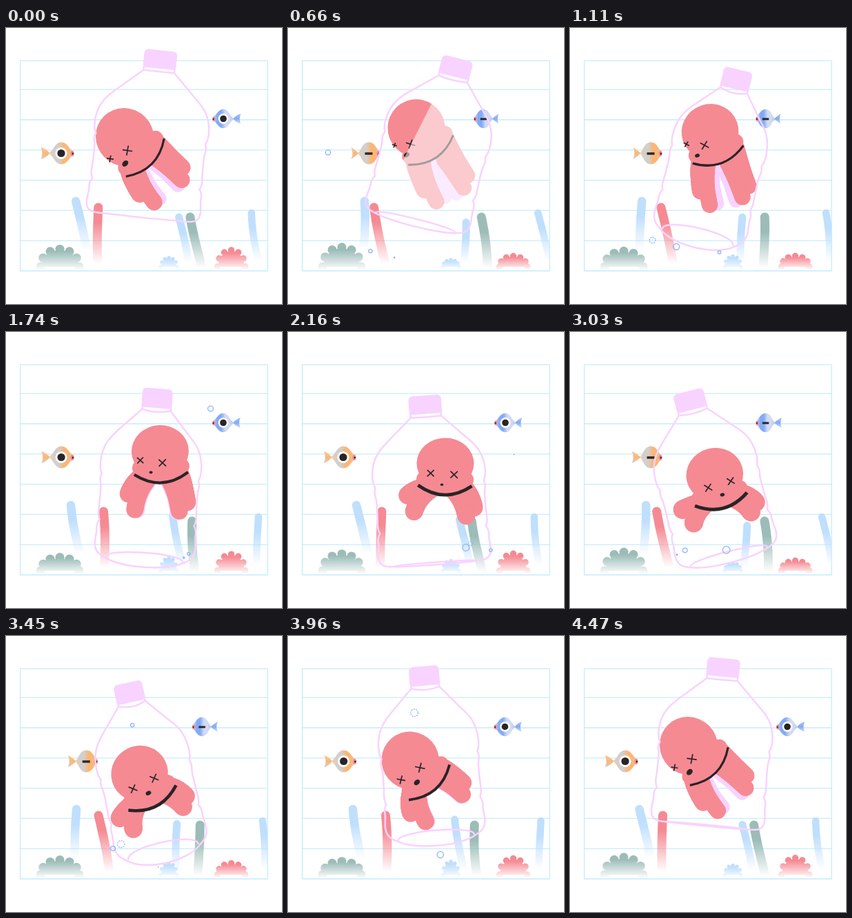
Write an HTML page with a canvas that moves like this. It is 400 by 400 pixels and loops after 4.5 s.

```html
<!DOCTYPE html>
<html lang="en">
<head>
<meta charset="utf-8">
<title>Octopus in a bottle</title>
<style>
html, body { margin: 0; width: 100%; height: 100%; overflow: hidden; background: #fff; }
canvas { display: block; width: 400px; height: 400px; }
</style>
</head>
<body>
<canvas id="stage"></canvas>
<script>
const LOOP = 4500, HALF = LOOP / 2, TAU = Math.PI * 2, DEG = Math.PI / 180;
const SALMON = '#f58a93', LILAC = '#f8d3ff', INK = '#2a2426';
const GREEN = '156,188,184', RED = '245,138,147', BLUE = '191,223,253';

const dpr = window.devicePixelRatio || 1;
function setup(c) {
  c.width = c.height = 400 * dpr;
  const g = c.getContext('2d');
  g.lineCap = g.lineJoin = 'round';
  g.scale(dpr, dpr);
  return g;
}
const stage = setup(document.getElementById('stage'));
const layer = document.createElement('canvas');
const octo = setup(layer);

const mix = (a, b, u) => a + (b - a) * u;

// Sine over one period that reaches mean + amp at time peak
const wave = (t, mean, amp, peak, period = LOOP) =>
  mean + amp * Math.cos(TAU * (t - peak) / period);

function ramp(t, from, to) {
  const u = Math.min(1, Math.max(0, (t - from) / (to - from)));
  return u * u * (3 - 2 * u);
}

function fade(g, rgb, y0, y1) {
  const f = g.createLinearGradient(0, y0, 0, y1);
  f.addColorStop(0, `rgb(${rgb})`);
  f.addColorStop(1, `rgba(${rgb},0)`);
  return f;
}

function disc(g, x, y, rx, ry, color) {
  g.fillStyle = color;
  g.beginPath();
  g.ellipse(x, y, rx, ry, 0, 0, TAU);
  g.fill();
}

function grid(g) {
  g.strokeStyle = '#c5edfb';
  g.lineWidth = 1.3;
  g.strokeRect(20.7, 47.4, 358.4, 304.6);
  g.beginPath();
  for (let i = 1; i <= 6; i++) {
    g.moveTo(21, 352 - 43.8 * i);
    g.lineTo(379, 352 - 43.8 * i);
  }
  g.stroke();
}

// The sway runs down the stem, so the foot follows an earlier phase than the tip
function weed(g, rgb, width, tip, foot, y0, y1, peak, t) {
  g.strokeStyle = fade(g, rgb, y0 + 22, y1 - 2);
  g.lineWidth = width;
  g.beginPath();
  for (let s = 0; s <= 1.001; s += 0.1) {
    g.lineTo(wave(t, mix(tip, foot, s), 8.5, peak - 500 * s, HALF), mix(y0, y1, s));
  }
  g.stroke();
}

function coral(g, rgb, x, size, h) {
  const y = 346, r = size * 0.19, rx = size - r, ry = h - r;
  g.fillStyle = fade(g, rgb, y - h * 0.7, y + 5);
  g.beginPath();
  g.ellipse(x, y, rx * 0.95, ry * 0.95, 0, Math.PI, TAU);
  for (let i = 0; i <= 6; i++) {
    const a = Math.PI * (1 + i / 6);
    const px = x + rx * Math.cos(a), py = y + ry * Math.sin(a);
    g.moveTo(px + r, py);
    g.arc(px, py, r, 0, TAU);
  }
  g.fill();
}

function seabed(g, t) {
  g.save();
  g.beginPath();
  g.rect(21, 47, 358, 305);
  g.clip();
  weed(g, BLUE, 12.5, 102.5, 109, 251, 324, 620, t);
  weed(g, RED, 13, 133, 141.5, 260, 344, 1720, t);
  weed(g, BLUE, 11, 250, 256, wave(t, 274, 8, 560, HALF), 342, 540, t);
  weed(g, GREEN, 13, 274.5, 282, 274, 350, 960, t);
  weed(g, BLUE, 10.5, 363.5, 371, 268, 340, 1280, t);
  coral(g, GREEN, 78, 34.5, wave(t, 30.5, 5, 450, HALF));
  coral(g, RED, 326.5, 25, wave(t, 24.5, 5.5, 2000, HALF));
  coral(g, BLUE, 236, 14.5, wave(t, 17, 5, 1600, HALF));
  g.restore();
}

function fish(g, x, y, dir, size, shut, [tint, pale, deep], t) {
  const tail = wave(t, -27.5, 2, HALF / 10, HALF / 5), w = 17.5 - 2 * shut;
  g.save();
  g.translate(x, y);
  g.scale(dir * size, size);
  const skin = g.createLinearGradient(-w, 0, w, 0);
  [tint, pale, pale, deep, deep, pale].forEach((c, i) => skin.addColorStop(i / 5, c));
  const fin = g.createLinearGradient(0, -8, 0, 8);
  [tint, deep, pale].forEach((c, i) => fin.addColorStop(i / 2, c));
  g.fillStyle = fin;
  g.beginPath();
  g.moveTo(-w + 1, 0);
  g.quadraticCurveTo(-22, -7, tail, -8.5);
  g.quadraticCurveTo(tail + 4, 0, tail, 8.5);
  g.quadraticCurveTo(-22, 7, -w + 1, 0);
  g.fill();
  g.fillStyle = skin;
  g.beginPath();
  g.moveTo(-w, 0);
  g.bezierCurveTo(-10, -6, -9, -16, 0, -16);
  g.bezierCurveTo(9, -16, 11, -6, w, -3);
  g.quadraticCurveTo(w + 2, 0, w, 3);
  g.bezierCurveTo(11, 6, 9, 16, 0, 16);
  g.bezierCurveTo(-9, 16, -10, 6, -w, 0);
  g.fill();
  disc(g, w - 1.5, 0.5, 2.6, 4, SALMON);
  disc(g, w - 0.8, 0.5, 1.2, 1.5, INK);
  if (shut > 0.8) {
    g.fillStyle = INK;
    g.fillRect(-5.5, -1.2, 11, 3.4);
  } else {
    disc(g, 0, 0, 8.6, 8.6 * (1 - shut), '#fff');
    disc(g, 0, 0, 5.6, 5.6 * (1 - shut), INK);
  }
  g.restore();
}

// Bubbles start near the bed, every fourth one higher up
let seed = 7;
const random = () => (seed = seed * 16807 % 2147483647) / 2147483647;
const bubbles = Array.from({ length: 14 }, (_, i) => ({
  birth: 40 + i * 260,
  x: mix(58, 350, random()),
  y: i % 4 ? mix(325, 340, random()) : mix(110, 210, random()),
  r: mix(3, 5.5, random())
}));

function bubble(g, { birth, x, y, r }, t) {
  const age = t - birth;
  if (age < 0 || age > 830) return;
  g.strokeStyle = '#8fb2fa';
  g.lineWidth = 1.3;
  g.setLineDash(age > 730 ? [1, 2.4] : []);
  g.beginPath();
  g.arc(x, y - age * 0.035, r * Math.min(1, age / 600), 0, TAU);
  g.stroke();
  g.setLineDash([]);
}

// Tapered limb: a row of discs along a curve
function limb(g, x, tipX, tipY, r, color) {
  const y = 34;
  for (let s = 0; s <= 1; s += 0.03125) {
    const bend = s * (1 - s) * 0.5;
    const px = mix(x, tipX, s + bend), py = mix(y, tipY, s - bend * 0.5);
    const pr = mix(14, r, Math.min(1, s * 1.5));
    disc(g, px, py, pr, pr, color);
  }
}

function cross(g, x, y, sx, s) {
  g.beginPath();
  g.moveTo(x - sx, y - s);
  g.lineTo(x + sx, y + s);
  g.moveTo(x + sx, y - s);
  g.lineTo(x - sx, y + s);
  g.stroke();
}

// Eyes and mouth sit on a sphere that turns sideways
function face(g, t, tilt) {
  const R = 41, yaw = Math.asin(wave(t, -14.5, 18.5, 2875) / R);
  g.strokeStyle = INK;
  g.lineWidth = 1.7;
  for (const a of [yaw - 0.43, yaw + 0.43]) {
    g.save();
    g.translate(R * Math.sin(a), 17 * Math.cos(a));
    g.rotate(-tilt * 0.2);
    cross(g, 0, 0, 4.8 * Math.cos(a) ** 0.5, 4.6 * Math.cos(a) ** 0.5);
    g.restore();
  }
  const m = wave(t, 3.7, 1.3, 4375);
  disc(g, R * Math.sin(yaw), 16 + 15 * Math.cos(yaw), m, m * 0.75, INK);
}

function octopus(g, t) {
  const tilt = wave(t, -22, 23, 2150) * DEG;
  const curl = wave(t, 0.5, 0.5, 2875);
  const chin = wave(t, 28, 5, 4190);
  const peek = 14 * (1 - curl) ** 2;
  g.clearRect(0, 0, 400, 400);
  g.save();
  g.translate(wave(t, 200, 28, 2160), wave(t, 176, 31, 2940));
  g.rotate(tilt);

  // base, tip across, tip down, spread when curled, lilac inside
  for (const [x, tx, ty, spread, inside] of [
    [26, 24, 98, 24, -1], [9, 10, 110, 28, -1], [-25, -40, 82, -18, 0], [-16, -34, 105, -13, 1]
  ]) {
    const px = tx + spread * curl, py = ty - 45 * curl, r = mix(11.5, 13.5, curl);
    if (inside) limb(g, x + inside * peek * 0.5, px + inside * peek, py + 2, r - 2, LILAC);
    limb(g, x, px, py, r, SALMON);
  }

  disc(g, 0, 0, 41.5, wave(t, 40, 3, 0), SALMON);
  g.strokeStyle = SALMON;
  g.lineWidth = 23;
  g.beginPath();
  g.moveTo(-30, chin);
  g.lineTo(30, chin);
  g.stroke();

  const y = chin + 9;
  g.beginPath();
  g.moveTo(-39, y);
  g.quadraticCurveTo(0, y + 27, 39, y);
  g.fill();
  g.strokeStyle = INK;
  g.lineWidth = wave(t, 4, 1.1, 2750);
  g.lineCap = 'butt';
  g.stroke();
  g.lineCap = 'round';
  face(g, t, tilt);
  g.restore();
  glare(g, t);
}

// Slanted sheen passing over the octopus
function glare(g, t) {
  const x = 208 + (t - 660) * 0.8;
  if (x < -60 || x > 330) return;
  g.globalCompositeOperation = 'source-atop';
  g.fillStyle = 'rgba(255,255,255,.55)';
  g.beginPath();
  g.moveTo(x + 4, 100);
  g.lineTo(x + 154, 100);
  g.lineTo(x + 64, 280);
  g.lineTo(x - 86, 280);
  g.fill();
  g.globalCompositeOperation = 'source-over';
}

function bottle(g, t) {
  // Nodding twice per loop narrows the bottle and rounds its base
  const nod = wave(t, 0, 1, HALF / 12, HALF);
  const w = 76 + 8 * nod, base = Math.max(0, 12 - 13 * nod);
  const narrow = 0.3 + 0.7 * w / 83, neck = 22.5 * narrow, cap = 24 * narrow;
  g.save();
  g.translate(209, wave(t, 216, 31, 2375));
  g.rotate(wave(t, 0, 14.5, 825) * DEG);
  g.translate(0, -123);
  g.fillStyle = g.strokeStyle = LILAC;
  g.lineWidth = 2.5;
  g.beginPath();
  g.roundRect(-cap, -31, cap * 2, 26.5 + base * 0.1, [6, 6, 4, 4]);
  g.fill();
  g.beginPath();
  g.moveTo(-neck, 0);
  g.quadraticCurveTo(0, base * 0.35, neck, 0);
  const mid = -2, floor = 212;
  for (const side of [-1, 1]) {
    const p = k => mid + side * k * w;
    g.moveTo(side * neck, -6);
    g.lineTo(side * neck, 0);
    g.lineTo(p(0.7), 33);
    g.bezierCurveTo(p(0.86), 45, p(0.98), 56, p(1), 78);
    g.quadraticCurveTo(p(1.01), 92, p(0.96), 98);
    g.quadraticCurveTo(p(1), 104, p(0.97), 112);
    g.quadraticCurveTo(p(0.95), 118, p(0.97), 150);
    g.quadraticCurveTo(p(0.98), 158, p(0.94), 164);
    g.quadraticCurveTo(p(1), 170, p(0.98), 180);
    g.lineTo(p(1), 196);
    g.bezierCurveTo(p(1), 209, p(0.92), floor + base * 0.1, p(0.8), floor + base * 0.35);
  }
  g.bezierCurveTo(mid + 0.45 * w, floor + 1.2 * base, mid - 0.45 * w, floor + 1.2 * base,
    mid - 0.8 * w, floor + base * 0.35);
  if (base > 1) {
    const r = 0.76 * w, y = floor + base * 0.3, top = y - base * 0.75;
    g.moveTo(mid - r, y);
    g.bezierCurveTo(mid - r, top, mid + r, top, mid + r, y);
  }
  g.stroke();
  g.restore();
}

// Brief flick of light beside the bottle
function streak(g, t) {
  if (t < 2550 || t > 2680) return;
  g.strokeStyle = LILAC;
  g.lineWidth = 3;
  g.beginPath();
  g.moveTo(96, 110);
  g.bezierCurveTo(107, 99, 101, 88, 110, 73);
  g.stroke();
}

function draw(t) {
  const g = stage, h = t % HALF;
  const dart = ramp(h, 330, 650) - ramp(h, 1150, 1760);
  g.fillStyle = '#fff';
  g.fillRect(0, 0, 400, 400);
  grid(g);
  seabed(g, t);
  fish(g, 80 + 37 * dart, 181.5, 1, 1, dart, ['#f9c9a0', '#d3cfcc', '#fbb676'], t);
  fish(g, 315 - 31.5 * dart, 131.5, -1, 0.86, dart, ['#a9c4f8', '#d3dbf3', '#82abf8'], t);
  octopus(octo, t);
  g.drawImage(layer, 0, 0, 400, 400);
  bottle(g, t);
  streak(g, t);
  bubbles.forEach(b => bubble(g, b, t));
}

const start = performance.now();
function tick() {
  draw((performance.now() - start) % LOOP);
  requestAnimationFrame(tick);
}
tick();
</script>
</body>
</html>
```
